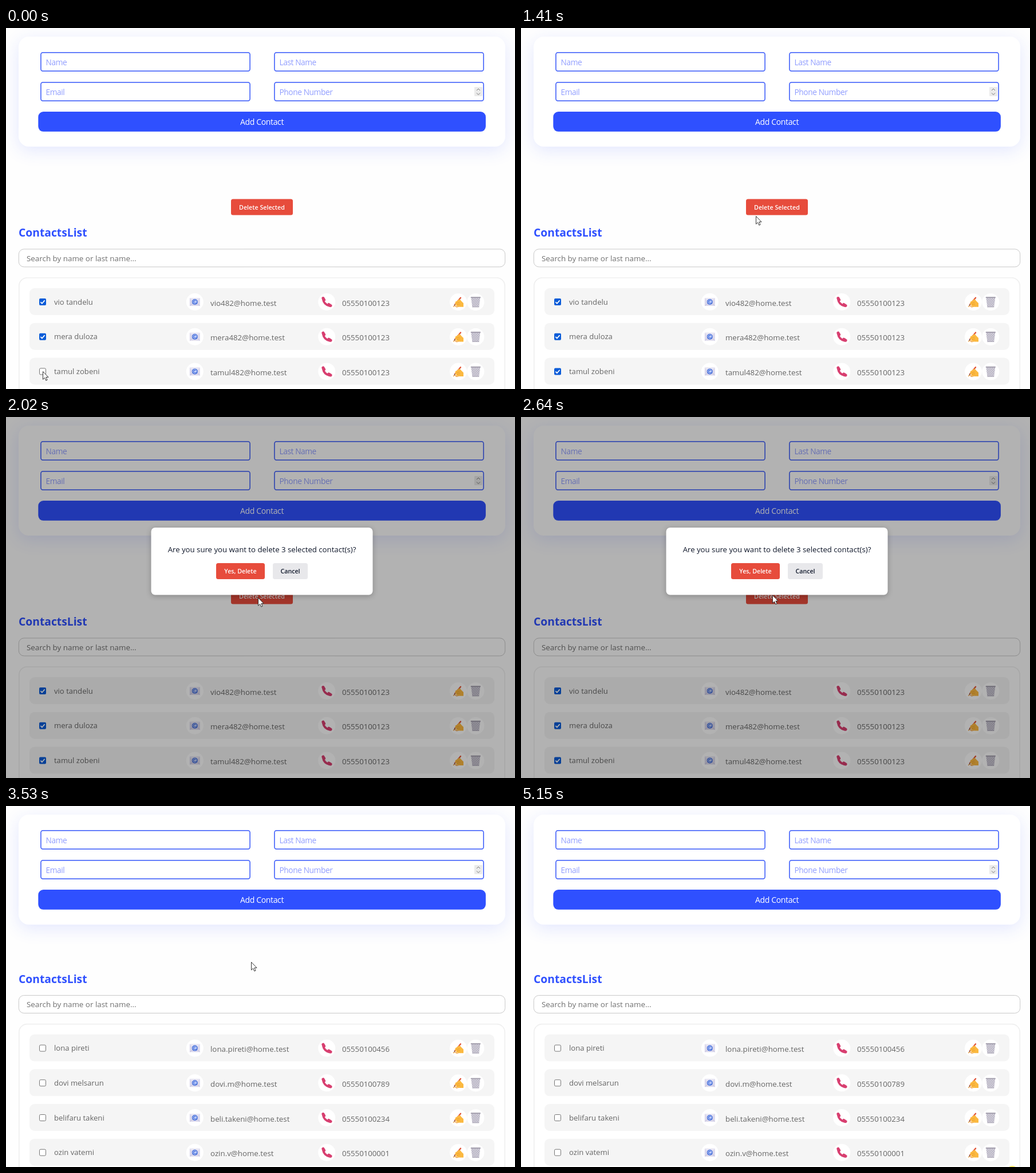
An HTML page with a canvas for the animation above (5220 ms loop, 889 by 630 pixels).

```html
<!DOCTYPE html>
<html lang="en">
<head>
<meta charset="utf-8">
<title>Contacts</title>
<style>
html, body { margin: 0; width: 100%; height: 100%; overflow: hidden; background: #fefefe; }
canvas { display: block; width: 889px; height: 630px; }
</style>
</head>
<body>
<canvas id="stage" width="889" height="630"></canvas>
<script>
const ctx = document.getElementById('stage').getContext('2d');
const LOOP = 5220, TICK = 70, ROW_STEP = 60.7;
const BLUE = '#2f50ff', RED = '#e74c3c';
const FACE = '"Open Sans", "Noto Sans", sans-serif';

const before = [
  ['vio tandelu', 'vio482@home.test', '05550100123'],
  ['mera duloza', 'mera482@home.test', '05550100123'],
  ['tamul zobeni', 'tamul482@home.test', '05550100123']
];
const after = [
  ['lona pireti', 'lona.pireti@home.test', '05550100456'],
  ['dovi melsarun', 'dovi.m@home.test', '05550100789'],
  ['belifaru takeni', 'beli.takeni@home.test', '05550100234'],
  ['ozin vatemi', 'ozin.v@home.test', '05550100001']
];

// Pointer path: time, x, y
const path = [
  [0, 64, 599], [60, 64, 599], [130, 65, 603], [920, 65, 603],
  [1410, 410, 328], [1750, 440, 315], [2570, 440, 315], [2920, 430, 273],
  [3130, 430, 273], [3200, 430, 272], [3529, 430, 272], [3530, 428, 272],
  [3860, 428, 272], [4070, 257, 350], [4280, 475, 473], [4400, 468, 481],
  [4680, 798, 613], [4750, 858, 638], [LOOP, 858, 638]
];
const clicks = [[400, 660, 64, 603], [1880, 2020, 440, 315], [5150, LOOP, 858, 638]];

function box(x, y, w, h, r, fill, stroke, line = 1) {
  ctx.beginPath();
  ctx.roundRect(x, y, w, h, r);
  if (fill) { ctx.fillStyle = fill; ctx.fill(); }
  if (stroke) { ctx.strokeStyle = stroke; ctx.lineWidth = line; ctx.stroke(); }
}

function shadowBox(x, y, w, h, r, color, blur, dy) {
  ctx.save();
  ctx.shadowColor = color;
  ctx.shadowBlur = blur;
  ctx.shadowOffsetY = dy;
  box(x, y, w, h, r, '#fff');
  ctx.restore();
}

function text(str, x, y, size, color, { weight = 400, align = 'left', spacing = 0 } = {}) {
  ctx.font = `${weight} ${size}px ${FACE}`;
  ctx.letterSpacing = spacing + 'px';
  ctx.textAlign = align;
  ctx.fillStyle = color;
  ctx.fillText(str, x, Math.round(y));
}

function disc(x, y, r, fill) {
  ctx.beginPath();
  ctx.arc(x, y, r, 0, Math.PI * 2);
  ctx.fillStyle = fill;
  ctx.fill();
}

function line(d, color, width) {
  ctx.strokeStyle = color;
  ctx.lineWidth = width;
  ctx.stroke(new Path2D(d));
}

function shape(d, fill) {
  ctx.fillStyle = fill;
  ctx.fill(new Path2D(d));
}

function badge(x, y, draw) {
  ctx.save();
  ctx.translate(x, y);
  disc(0, 0, 15, '#fff');
  ctx.lineCap = ctx.lineJoin = 'round';
  draw();
  ctx.restore();
}

function mailIcon() {
  box(-9, -7, 18, 14, 1, '#dcd9ec');
  line('M-8.5 6.5L-1 0M8.5 6.5L1 0', '#c5c1dc', 1);
  shape('M-9 -7H9L0 2Z', '#e9e7f4');
  disc(0, 0, 5, '#456fdb');
  line('M1.7 -1.7V1.2Q3.2 1.8 3.2 -.4A3.2 3.2 0 1 0 1.2 3', '#e8edff', 0.8);
  disc(0, 0, 1.5, '#c9d6ff');
}

function phoneIcon() {
  const pink = '#d83f70';
  line('M-6.5 -5Q-5 4.5 5 7', pink, 3.8);
  line('M-6.3 -6.5L-4.6 -3.6M3.6 4.5L6.8 6.5', pink, 5);
}

function writeIcon() {
  const skin = '#fbb940';
  line('M4 -7.5L-6 4.5', '#e2573a', 2.4);
  line('M-6 4.5L-7.5 7', '#6b5560', 1.2);
  line('M-8.5 8Q-5.5 5.5 -4.5 7.5T0 8', '#f0a040', 1.3);
  shape('M-4.5 1L0 -4Q3 -6 5 -2L9 2V8.5H2Q-3 8.5 -4.5 1Z', skin);
  line('M-4 .5L1.5 -2M-4.5 3.2L2 2M-2.5 6L3 5', skin, 2.8);
  line('M-3 2L2 .8M-2.5 4.8L2.5 3.8', '#e59a2c', 0.7);
}

function binIcon() {
  const body = 'M-8 -8H8L5.8 9H-5.8Z';
  shape(body, '#d3d0db');
  ctx.save();
  ctx.clip(new Path2D(body));
  for (let i = -24; i < 24; i += 4) {
    line(`M${i} -9l18 18M${i} 9l18 -18`, '#aba7b6', 0.7);
  }
  ctx.restore();
  line('M-7.8 -8H7.8', '#9f9aa9', 1.7);
  line('M-5.5 8.5H5.5', '#b3afbd', 1.2);
}

function checkbox(x, y, on, hover) {
  if (!on) {
    box(x - 5.5, y - 5.5, 11, 11, 2, '#fff', hover ? '#5f6368' : '#767676');
    return;
  }
  box(x - 6, y - 6, 12, 12, 2, hover ? '#1f6fe8' : '#0a5cd8');
  line(`M${x - 3.6} ${y + 0.2}l2.5 2.6l4.7 -5.4`, '#fff', 1.7);
}

function contact([name, mail, phone], y, on, hover) {
  box(41, y, 812, 47, 9, '#f5f5f5');
  checkbox(64, y + 24, on, hover);
  const ink = '#666';
  text(name, 84, y + 28.7, 13.1, ink);
  badge(329.8, y + 24, mailIcon);
  text(mail, 357, y + 30.7, 13.3, ink);
  badge(560.2, y + 24, phoneIcon);
  text(phone, 587, y + 30.7, 13.2, ink);
  badge(790, y + 24.2, writeIcon);
  badge(820.3, y + 24.2, binIcon);
}

function field(label, x, y) {
  box(x + 0.9, y + 0.9, 365.2, 32.2, 3.5, '#fff', '#506dfa', 1.75);
  text(label, x + 9.5, y + 23, 13.7, '#909dff', { spacing: -0.4 });
}

function form() {
  shadowBox(22, 15, 850, 192, 18, 'rgba(47,80,255,.13)', 30, 7);
  field('Name', 60, 42);
  field('Last Name', 468, 42);
  field('Email', 60, 94);
  field('Phone Number', 468, 94);
  box(818, 103, 14, 16, 1, '#ebebeb');
  line('M822 109l3 -3l3 3M822 113.5l3 3l3 -3', '#777', 1);
  box(56.3, 146, 781.6, 34.8, 9, BLUE);
  text('Add Contact', 447, 169, 14, '#fff', { align: 'center', spacing: -0.35 });
}

function button(label, x, y, w, fill, ink) {
  box(x, y, w, 28, 3.5, fill);
  text(label, x + w / 2, y + 18.2, 10.7, ink, { weight: 600, align: 'center' });
}

function list(rows, top, isOn, hovered) {
  text('ContactsList', 22, top + 7, 19.3, BLUE, { weight: 700 });
  box(22.3, top + 28.9, 849.4, 31, 9, '#fff', '#c9c9c9');
  text('Search by name or last name...', 36, top + 49.8, 13.4, '#707070');
  box(22.8, top + 79, 848.4, 400, 14, '#fff', '#efefef', 1.6);
  rows.forEach((row, i) => contact(row, top + 97 + i * ROW_STEP, isOn(i), i === hovered));
}

function dialog() {
  ctx.fillStyle = 'rgba(0,0,0,.3)';
  ctx.fillRect(0, 0, 889, 630);
  shadowBox(253.5, 193, 387, 117.5, 7, 'rgba(0,0,0,.25)', 10, 2);
  text('Are you sure you want to delete 3 selected contact(s)?', 447, 236, 13.2, '#0f172a', { align: 'center' });
  button('Yes, Delete', 367, 255, 85, RED, '#fff');
  button('Cancel', 466, 255, 61, '#e8e8eb', '#0f172a');
}

function pointerAt(t) {
  const i = path.findIndex(k => k[0] > t);
  const [t0, x0, y0] = path[i - 1], [t1, x1, y1] = path[i];
  const p = Math.floor((t - t0) / TICK) * TICK / (t1 - t0);
  const e = p * p * (3 - 2 * p);
  return [x0 + (x1 - x0) * e, y0 + (y1 - y0) * e];
}

const inside = (x, y, l, t, r, b) => x >= l && x <= r && y >= t && y <= b;

function pointerKind(x, y, open, removed) {
  if (open) return inside(x, y, 367, 255, 452, 283) ? 'hand' : 'arrow';
  if (!removed) return inside(x, y, 393, 298, 501, 326) ? 'hand' : 'arrow';
  const overText = inside(x, y, 22, 330, 872, 361) || inside(x, y, 357, 476, 472, 492);
  return overText ? 'beam' : 'arrow';
}

const outlines = {
  arrow: 'M.5 .5V14.2L3.6 11.3L5.8 16.2L8 15.2L5.9 10.4H10Z',
  hand: 'M-1.5 12V1.5Q-1.5 0 0 0T1.5 1.5V7Q1.8 5.6 3.2 6T4.4 7.6Q5 6.4 6.2 7T7.2 8.6' +
        'Q8.8 8 8.8 10V14Q8.8 17 7.2 18.6V20.5H-1V18.5L-5.6 12.6Q-6.4 10.6 -4.2 10.6Z'
};

function pointer(x, y, kind) {
  ctx.save();
  ctx.translate(x, y);
  if (kind === 'beam') {
    line('M-3 -7.5Q0 -7.5 0 -6V6Q0 7.5 -3 7.5M3 -7.5Q0 -7.5 0 -6M0 6Q0 7.5 3 7.5', '#333', 1.1);
  } else {
    shape(outlines[kind], '#fff');
    ctx.lineJoin = 'round';
    line(outlines[kind], '#222', 0.9);
    if (kind === 'hand') line('M1.5 7V11M4.4 8V11M7.1 9V11.5', '#222', 0.8);
  }
  ctx.restore();
}

function draw(t) {
  const removed = t >= 3530, open = t >= 2020 && !removed;
  ctx.fillStyle = '#fefefe';
  ctx.fillRect(0, 0, 889, 630);
  form();
  if (removed) {
    list(after, 301.6, () => false, -1);
  } else {
    button('Delete Selected', 393, 298.4, 108, RED, '#fff');
    list(before, 357, i => i < 2 || t >= 530, t >= 70 && t < 990 ? 2 : -1);
  }
  if (open) dialog();
  for (const [from, to, x, y] of clicks) {
    if (t >= from && t < to) disc(x, y, 10, 'rgba(255,230,0,.6)');
  }
  const [x, y] = pointerAt(t);
  pointer(x, y, pointerKind(x, y, open, removed));
}

let start;
function tick(now) {
  start ??= now;
  draw((now - start) % LOOP);
  requestAnimationFrame(tick);
}
requestAnimationFrame(tick);
</script>
</body>
</html>
```
